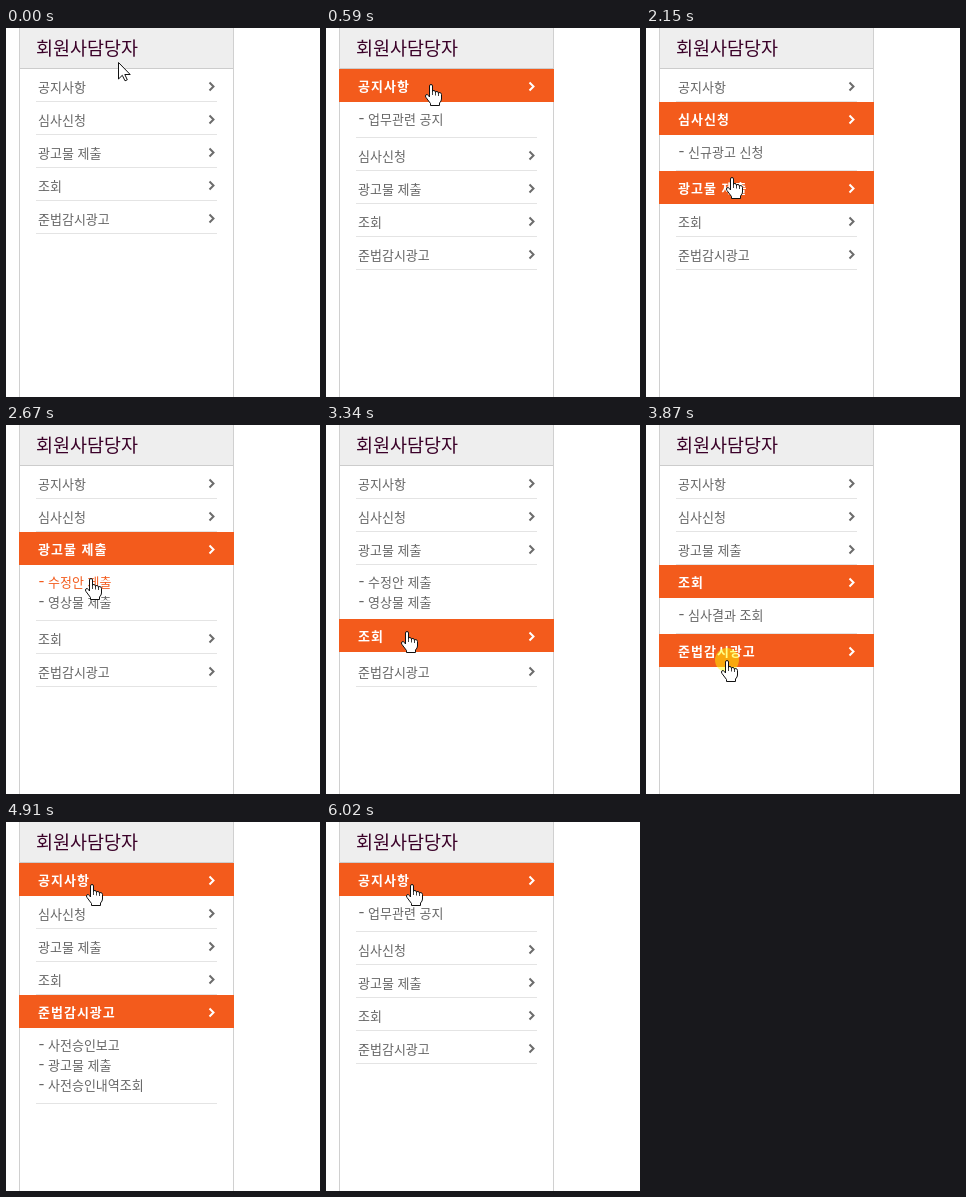
Recreate the animation shown at these times as an HTML page. Size 314 by 369 pixels, loop 6.17 s.

```html
<!DOCTYPE html>
<html lang="ko">
<head>
<meta charset="utf-8">
<title>메뉴</title>
<style>
html, body { margin: 0; width: 100%; height: 100%; overflow: hidden; background: #fff; }
svg { display: block; }
text { font: 13px "Noto Sans CJK KR", "Noto Sans CJK", sans-serif; fill: #666; }
.title { font-size: 18.5px; font-weight: 500; fill: #3a0028; }
.dash { font-size: 17px; }
.line { fill: #e4e4e4; }
.bar { fill: #f35b1c; display: none; }
.arrow { fill: none; stroke: #6c6c6c; stroke-width: 2; }
.lit .bar { display: inline; }
.lit text { font-weight: 700; letter-spacing: 1px; fill: #fff; }
.lit .arrow { stroke: #fff; }
.over text { fill: #f35b1c; }
.cursor path { fill: #fff; stroke: #111; stroke-linejoin: round; }
</style>
</head>
<body>
<svg width="314" height="369" viewBox="0 0 314 369">
  <rect x="13" width="215" height="40" fill="#eee"/>
  <rect x="13" y="40" width="215" height="1" fill="#ccc"/>
  <rect x="13" width="1" height="369" fill="#d0d0d0"/>
  <rect x="227" width="1" height="369" fill="#d0d0d0"/>
  <text class="title" x="30" y="27">회원사담당자</text>
  <g id="menu"></g>
  <path id="trail" d="M97 63l5-2M102 51l4 1 6 7 4 5M104 62l2-2" fill="none" stroke="#7c2c10"/>
  <circle id="ring" r="12" fill="#ff0" fill-opacity=".47"/>
  <g id="pointer" class="cursor"><path d="M-.5.5V17L3.3 13.3 6 18.8 8.3 17.8 5.8 12.5H11.2Z"/></g>
  <g id="hand" class="cursor">
    <path d="M-1.5 13V2Q-1.5.5 0 .5T1.5 2V7.5Q1.8 6.3 3 6.5 4.5 6.6 4.5 8.5 4.8 7.3 6 7.5 7.5 7.6 7.5 9.3 8 8.3 9 8.6 10.5 9 10.5 10.5V15Q10.5 17 8.5 19V21.5H-.5V19.5L-5 13.5Q-6.2 11.8-5 10.8-3.8 10-2.6 11.5Z"/>
    <path d="M1.5 7V11M4.5 8V11.5M7.5 9V12" stroke-width=".8"/>
  </g>
</svg>
<script>
const LOOP = 6170, TICKS = 83, TICK = LOOP / TICKS;
const ROW = 33, TOP = 41, HOLD = 2, SLIDE = 2.7;

const MENU = [
  ['공지사항', '업무관련 공지'],
  ['심사신청', '신규광고 신청'],
  ['광고물 제출', '수정안 제출', '영상물 제출'],
  ['조회', '심사결과 조회'],
  ['준법감시광고', '사전승인보고', '광고물 제출', '사전승인내역조회']
];

// times below are in ticks
const CLICKS = [[1, 0], [19, 1], [31, 2], [43, 3], [52, 4], [76, 0]]
  .map(([press, item]) => ({ press, item, open: press + HOLD }));

const START = { x: 113, y: 34 };
const MOVES = [
  { from: 0, to: 1, x: 105, y: 50 },
  { from: 6, to: 8, x: 105, y: 56 },
  { from: 9, to: 12, x: 98, y: 114 },
  { from: 12, to: 15, x: 91, y: 86 },
  { from: 16, to: 18, x: 90, y: 121 },
  { from: 27, to: 31, x: 85, y: 153 },
  { from: 37, to: 41, x: 81, y: 206 },
  { from: 46, to: 49, x: 81, y: 235 },
  { from: 60, to: 66, x: 86, y: 62 }
];

const $ = id => document.getElementById(id);
const clamp = v => Math.max(0, Math.min(1, v));
const swing = u => (1 - Math.cos(Math.PI * clamp(u))) / 2;
const easeOut = u => 1 - (1 - clamp(u)) ** 3;
const place = (el, x, y) => el.setAttribute('transform', `translate(${x} ${y})`);
const show = (el, on) => el.style.display = on ? '' : 'none';

function add(parent, tag, attrs, text) {
  const el = document.createElementNS('http://www.w3.org/2000/svg', tag);
  for (const key in attrs) el.setAttribute(key, attrs[key]);
  if (text) el.textContent = text;
  return parent.appendChild(el);
}

const items = MENU.map(([label, ...subs]) => {
  const full = 16 + 20 * subs.length;
  const row = add($('menu'), 'g', {});
  add(row, 'rect', { class: 'line', x: 30, y: 32, width: 181, height: 1 });
  add(row, 'rect', { class: 'bar', x: 13, width: 215, height: ROW });
  const name = add(row, 'text', { x: 32, y: 23 }, label);
  add(row, 'path', { class: 'arrow', d: 'M203.5 13.5l4 4-4 4' });

  const panel = add($('menu'), 'svg', { x: 0, width: 314, height: 0 });
  add(panel, 'rect', { class: 'line', x: 30, y: full - 1, width: 181, height: 1 });
  const links = subs.map((sub, i) => {
    const link = add(panel, 'g', {});
    add(link, 'text', { class: 'dash', x: 32.5, y: 23 + 20 * i }, '-');
    add(link, 'text', { x: 42, y: 22 + 20 * i }, sub);
    return link;
  });
  return { row, name, panel, links, full };
});

function tip(n) {
  let { x, y } = START;
  for (const move of MOVES) {
    const k = easeOut((n - move.from) / (move.to - move.from));
    x += (move.x - x) * k;
    y += (move.y - y) * k;
  }
  return [Math.round(x), Math.round(y)];
}

function draw(time) {
  // screen updates land a little before their nominal tick
  const n = Math.floor((time + 15) / TICK) % TICKS;
  const [x, y] = tip(n);
  const [now, last] = CLICKS.filter(c => c.open <= n).reverse();
  const p = now ? swing((n - now.open + 1 / 3) / SLIDE) : 0;

  let top = TOP;
  items.forEach((item, i) => {
    const active = now?.item === i;
    const closing = last?.item === i;
    const h = active ? Math.ceil(item.full * p) : closing ? Math.round(item.full * (1 - p)) : 0;
    const lit = active || (y >= top && y < top + ROW);
    place(item.row, 0, top);
    item.row.classList.toggle('lit', lit);
    item.name.setAttribute('y', lit ? 22 : 23);
    top += ROW;

    show(item.panel, h > 0);
    item.panel.setAttribute('y', top);
    item.panel.setAttribute('height', h);
    item.links.forEach((link, k) => {
      const d = y - top - 7 - 20 * k;
      link.classList.toggle('over', d >= 0 && d < 20 && y < top + h);
    });
    top += h;
  });

  const onMenu = y >= TOP;
  show($('hand'), onMenu);
  show($('pointer'), !onMenu);
  show($('ring'), CLICKS.some(c => n >= c.press && n < c.open));
  show($('trail'), n > 8 && n < CLICKS[1].open);
  for (const id of ['hand', 'pointer', 'ring']) place($(id), x, y);
}

const begin = performance.now();
function loop() {
  draw((performance.now() - begin) % LOOP);
  requestAnimationFrame(loop);
}
loop();
</script>
</body>
</html>
```
